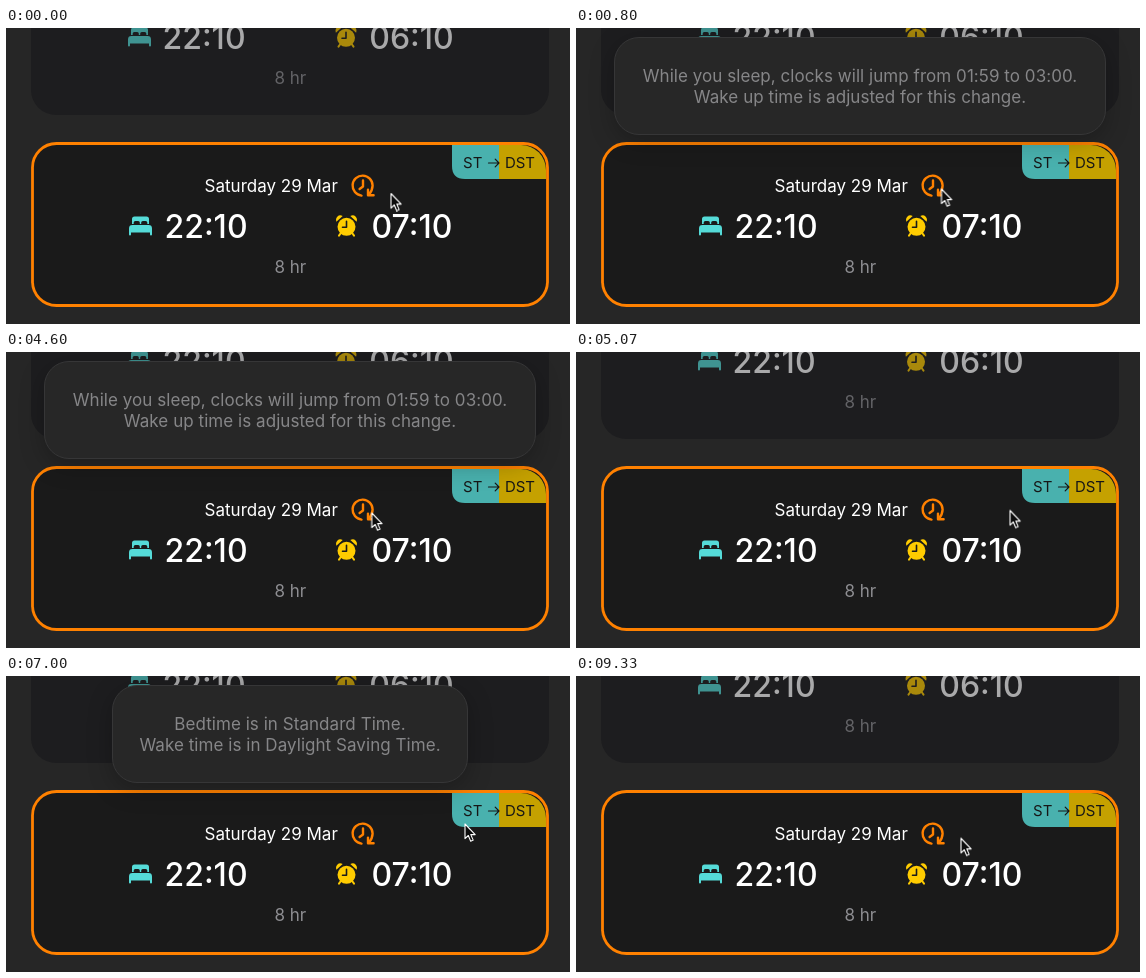
Animation, 564 px wide and 296 px high, one loop 9.4 s. Source, as an HTML page:

```html
<!DOCTYPE html>
<html lang="en">
<head>
<meta charset="utf-8">
<title>Sleep schedule</title>
<style>
  :root { --loop: 9.4s; --card: #1a1a1a; }
  html, body { margin: 0; width: 100%; height: 100%; overflow: hidden; background: #262626; }
  body { position: relative; font: 17px/21px Inter, "Liberation Sans", sans-serif; }
  svg { position: absolute; left: 0; top: 0; display: block; }
  text { text-anchor: middle; fill: #fff; }
  .time { font-size: 32px; font-weight: 450; }
  .hours { fill: #8e8e92; }
  .badge text { font-size: 15px; fill: #161616; }
  .past { opacity: .62; --card: #1d1d1f; }
  .bed { color: #55dbd8; }
  .alarm { color: #fc0; }

  .tip {
    position: absolute; top: 9px; height: 98px; box-sizing: border-box;
    padding-top: 28px; border: 1px solid #363637; border-radius: 25px;
    background: #272727; color: #868688; text-align: center; white-space: nowrap;
    letter-spacing: .05px; box-shadow: 0 6px 24px rgba(0, 0, 0, .25); opacity: 0;
  }
  .jump { left: 38px; width: 492px; animation: jump var(--loop) linear infinite; }
  .zone { left: 106px; width: 356px; animation: zone var(--loop) linear infinite; }
  .cursor { animation: move var(--loop) linear infinite; }

  @keyframes jump {
    0%, 5.1% { opacity: 0; animation-timing-function: ease-out; }
    8.4%, 49.8% { opacity: 1; animation-timing-function: ease-in-out; }
    53.2%, 100% { opacity: 0; }
  }
  @keyframes zone {
    0%, 57.2% { opacity: 0; animation-timing-function: ease-out; }
    60.8%, 92.6% { opacity: 1; animation-timing-function: ease-in-out; }
    96%, 100% { opacity: 0; }
  }
  @keyframes move {
    0%, 2.6% { transform: translate(385px, 165.5px); animation-timing-function: ease-in-out; }
    7.7%, 48.7% { transform: translate(365.5px, 161px); animation-timing-function: ease-in; }
    53.94% { transform: translate(434px, 158.5px); animation-timing-function: ease-out; }
    58.7%, 91.8% { transform: translate(459px, 148px); }
    92.2% { transform: translate(458px, 148.5px); animation-timing-function: ease-in-out; }
    99.2% { transform: translate(385px, 162px); }
    100% { transform: translate(385px, 165.5px); }
  }
</style>
</head>
<body>
<svg width="564" height="296" viewBox="0 0 564 296">
  <defs>
    <symbol id="bed" width="23" height="20" viewBox="0 0 23 20">
      <path fill="currentColor" d="M3 8V3Q3 .5 5.5 .5H17.5Q20 .5 20 3V8H18.3V6.6Q18.3 5 16.7 5H13.8Q12.2 5 12.2 6.6V8H10.8V6.6Q10.8 5 9.2 5H6.3Q4.7 5 4.7 6.6V8Z"/>
      <path fill="currentColor" d="M3.4 9H19.6Q23 9 23 12.4V18.4Q23 19.4 22 19.4T21 18.4V16.6H2V18.4Q2 19.4 1 19.4T0 18.4V12.4Q0 9 3.4 9Z"/>
    </symbol>
    <symbol id="alarm" width="22" height="22" viewBox="0 0 22 22">
      <path stroke="currentColor" stroke-width="2" stroke-linecap="round" d="M5 18.5 3.5 20.6M17 18.5 18.5 20.6"/>
      <g fill="currentColor">
        <circle cx="11" cy="11.8" r="9"/>
        <path d="M.9 6.7Q-.2 3.3 2 1.4T7.2 1.1ZM21.1 6.7Q22.2 3.3 20 1.4T14.8 1.1Z"/>
      </g>
      <path fill="none" style="stroke: var(--card)" stroke-width="1.6" stroke-linecap="round"
        stroke-linejoin="round" d="M11 6.3V12.3H7"/>
    </symbol>
  </defs>

  <rect x="25" y="-78" width="518" height="165" rx="25" fill="#1d1d1f"/>
  <g class="past">
    <use class="bed" href="#bed" x="122" y="-1"/>
    <text class="time" x="198" y="21">22:10</text>
    <use class="alarm" href="#alarm" x="329" y="-2"/>
    <text class="time" x="405.5" y="21">06:10</text>
    <text class="hours" x="284.3" y="56">8 hr</text>
  </g>

  <rect x="26.5" y="115.5" width="515" height="162" rx="24" fill="#1a1a1a"/>
  <g class="badge">
    <path fill="#49b1ae" d="M446 117H493V151H459Q446 151 446 138Z"/>
    <path fill="#c5a100" d="M493 117H515A25 25 0 0 1 540 142V151H493Z"/>
    <text x="466.7" y="140">ST</text>
    <path fill="none" stroke="#161616" stroke-width="1.2" stroke-linecap="round"
      stroke-linejoin="round" d="M482.5 135H493M489.2 131.2 493 135 489.2 138.8"/>
    <text x="514" y="140">DST</text>
  </g>
  <rect x="26.5" y="115.5" width="515" height="162" rx="24" fill="none" stroke="#ff8100" stroke-width="2.8"/>

  <text x="265.2" y="164">Saturday 29 Mar</text>
  <g fill="none" stroke="#ff8100" stroke-width="2.4" stroke-linecap="round" stroke-linejoin="round">
    <path d="M355.5 167.6A10 10 0 1 1 366.6 157.6Q366.4 162.5 363 166.4"/>
    <path d="M362 161.6V167.2H367.6M357 152.5V158.6L353.6 161"/>
  </g>
  <use class="bed" href="#bed" x="123" y="188"/>
  <text class="time" x="200" y="210">22:10</text>
  <use class="alarm" href="#alarm" x="329.5" y="187"/>
  <text class="time" x="406" y="210">07:10</text>
  <text class="hours" x="284.3" y="245">8 hr</text>
</svg>

<div class="tip jump">While you sleep, clocks will jump from 01:59 to 03:00.<br>Wake up time is adjusted for this change.</div>
<div class="tip zone">Bedtime is in Standard Time.<br>Wake time is in Daylight Saving Time.</div>

<svg width="564" height="296" viewBox="0 0 564 296">
  <path class="cursor" fill="#0c0c0c" stroke="#fff" stroke-width="1.1" stroke-linejoin="round"
    d="M0 0V14.6L3.3 11.5 5.7 17.2 8.2 16.1 5.8 10.6H10.2Z"/>
</svg>
</body>
</html>
```
